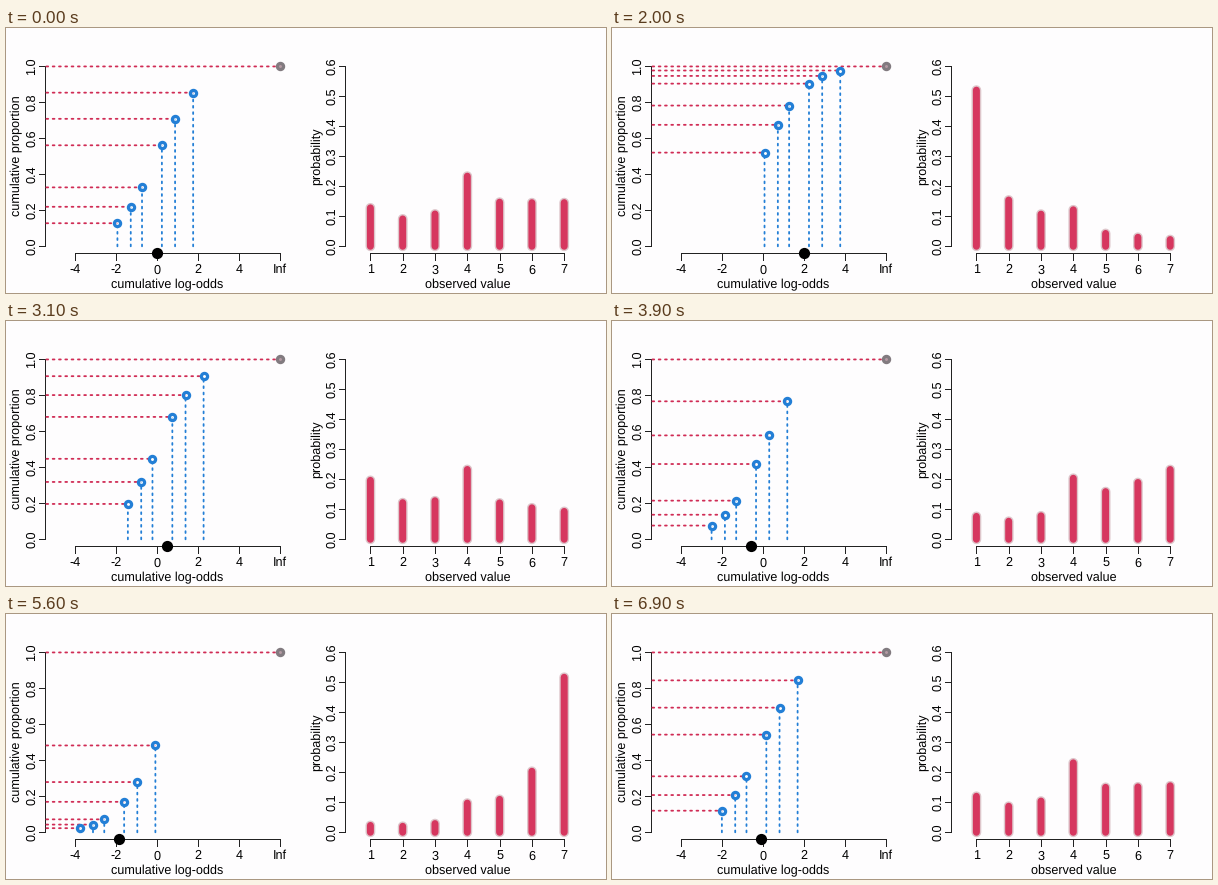
Recreate the animation shown at these times as a matplotlib script. Size 600 px wide and 265 px high, loop 7 s.

```python
import numpy as np
import matplotlib.pyplot as plt
from matplotlib.animation import FuncAnimation

W, H, DPI = 600, 265, 100
FRAMES, INTERVAL = 70, 100
PX = 72 / DPI  # points per pixel

PAPER, INK = "#fefdfe", "#222222"
RED, BLUE, GRAY, HALO = "#d6375f", "#237fd6", "#827b80", "#dec6cb"
DOT_RED = "#d02c55"
DOTTED = (0, (1, 2.5))

plt.rcParams["font.family"] = "Liberation Sans"
plt.rcParams["font.size"] = 12.6 * PX
plt.rcParams["text.hinting"] = "none"

# Cumulative proportions of responses 1 to 6 when the shift is zero
BASE = np.array([0.1283, 0.2197, 0.3276, 0.5616, 0.7088, 0.8543])
CUTS = np.log(BASE / (1 - BASE))

TOP, BOTTOM = 38.45, 218.3
AXIS_Y = 225.4
LEFT_X, RIGHT_X = 39.4, 339.4

fig = plt.figure(figsize=(W / DPI, H / DPI), dpi=DPI, facecolor=PAPER)
ax = fig.add_axes([0, 0, 1, 1])
ax.set_xlim(0, W)
ax.set_ylim(H, 0)
ax.axis("off")


def odds_x(v):
    return 150.8 + 20.55 * v


def value_x(v):
    return 364.4 + 32.3 * (v - 1)


def level_y(v, top_value=1.0):
    return BOTTOM - (BOTTOM - TOP) * v / top_value


def line(xs, ys, color=INK, width=1.0, **kw):
    return ax.plot(xs, ys, color=color, lw=width * PX, **kw)[0]


def label(x, y, text, rotation=0):
    ax.text(x, y, text, color="black", ha="center", va="baseline",
            rotation=rotation, rotation_mode="anchor")


def x_axis(places, names, title, title_x):
    line([places[0], places[-1]], [AXIS_Y] * 2)
    for x, name in zip(places, names):
        line([x, x], [AXIS_Y, AXIS_Y + 6.5])
        label(x, 245.4, name)
    label(title_x, 260.3, title)


def y_axis(x, values, title):
    line([x, x], [TOP, BOTTOM])
    for v in values:
        y = level_y(v, values[-1])
        line([x - 6.5, x], [y, y])
        label(x - 10, y, f"{v:.1f}", 90)
    label(x - 25.3, 127.8, title, 90)


def dotted(color):
    return line([], [], color, 1.8, ls=DOTTED, dash_capstyle="round",
                zorder=3, snap=False)


def ring(color):
    return line([], [], color, 0, marker="o", ms=6.2 * PX, mew=3.2 * PX,
                mfc=(1, 1, 1, 0.7), mec=color, zorder=5, snap=False)


def bar(color, width, zorder):
    return line([], [], color, width, solid_capstyle="round",
                zorder=zorder, snap=False)


x_axis([odds_x(v) for v in (-4, -2, 0, 2, 4, 6)],
       ["-4", "-2", "0", "2", "4", "Inf"], "cumulative log-odds", 161)
x_axis([value_x(v) for v in range(1, 8)],
       [str(v) for v in range(1, 8)], "observed value", 461.3)
y_axis(LEFT_X, np.linspace(0, 1, 6), "cumulative proportion")
y_axis(RIGHT_X, np.linspace(0, 0.6, 7), "probability")

dotted(DOT_RED).set_data([LEFT_X + 1, odds_x(6)], [TOP, TOP])
end = ring(GRAY)
end.set_data([odds_x(6)], [TOP])
end.set_markerfacecolor("#b49aa3")

levels = [dotted(DOT_RED) for _ in CUTS]
drops = [dotted(BLUE) for _ in CUTS]
rings = ring(BLUE)
halos = [bar(HALO, 9.8, 3) for _ in range(7)]
bars = [bar(RED, 7, 4) for _ in range(7)]
knob = line([], [], "black", 0, marker="o", ms=11.2 * PX, mew=0,
            zorder=6, snap=False)


def shift(i):
    """Steady sweep up to 2, down to -2 and back, resting at both ends."""
    return np.interp(i, [0, 14.4, 20, 49.5, 54.8, 69],
                     [0, 2, 2, -2, -2, -0.075])


def draw(i):
    phi = shift(i)
    cum = 1 / (1 + np.exp(-(CUTS + phi)))
    xs, ys = odds_x(CUTS + phi), level_y(cum)
    for x, y, level, drop in zip(xs, ys, levels, drops):
        level.set_data([LEFT_X + 1, x], [y, y])
        drop.set_data([x, x], [BOTTOM, y])
    rings.set_data(xs, ys)
    knob.set_data([odds_x(phi)], [AXIS_Y])

    probs = np.diff(np.concatenate([[0], cum, [1]]))
    for k, p in enumerate(probs):
        x = value_x(k + 1)
        for part in (halos[k], bars[k]):
            part.set_data([x, x], [BOTTOM, level_y(p, 0.6)])
    return [*levels, *drops, rings, *halos, *bars, knob]


anim = FuncAnimation(fig, draw, frames=FRAMES, interval=INTERVAL,
                     repeat=True, repeat_delay=0)
plt.show()
```
